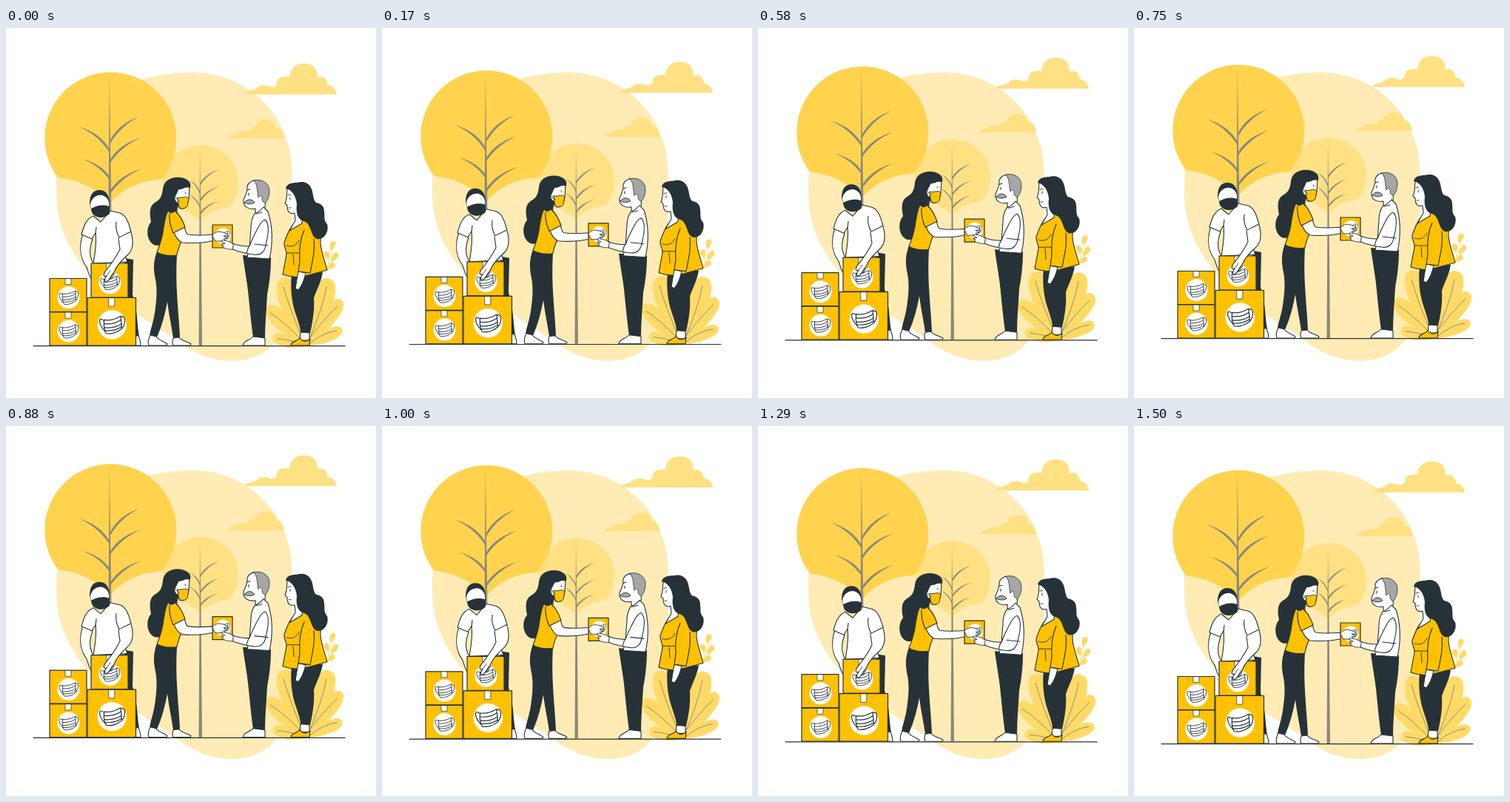
Recreate the animation shown at these times as an HTML page with a canvas. Size 500 by 500 pixels, loop 1.54 s.

```html
<!DOCTYPE html>
<html lang="en">
<head>
<meta charset="utf-8">
<title>Donation</title>
<style>
html, body { margin: 0; width: 100%; height: 100%; overflow: hidden; background: #fff; }
canvas { display: block; width: 500px; height: 500px; }
</style>
</head>
<body>
<canvas id="stage" width="500" height="500"></canvas>
<script>
const ctx = document.getElementById('stage').getContext('2d');
const INK = '#263238', YELLOW = '#ffc100', CROWN = '#ffd34d', PALE = '#ffe082',
      LEAF = '#ffda66', CREAM = '#ffebb3', WOOD = '#888780', GRAY = '#a6a6a6', WHITE = '#fff';
const LOOP = 1540, STEP = 1000 / 24, RISE = 10, CYCLE = 36;

function fill(d, color) {
  ctx.fillStyle = color;
  ctx.fill(new Path2D(d));
}

function line(d, width = 1.1, color = INK) {
  ctx.strokeStyle = color;
  ctx.lineWidth = width;
  ctx.stroke(new Path2D(d));
}

function shape(d, color, width) {
  fill(d, color);
  line(d, width);
}

function disc(x, y, r, color) {
  ctx.fillStyle = color;
  ctx.beginPath();
  ctx.arc(x, y, r, 0, 7);
  ctx.fill();
}

// Tapered twig that leaves the trunk steeply and flattens outwards.
function branch(x, y, dx, dy, w) {
  fill(`M${x} ${y} Q${x + dx * .3} ${y + dy * .72} ${x + dx} ${y + dy}
    Q${x + dx * .37} ${y + dy * .64} ${x} ${y + w * 4}Z`, WOOD);
}

function leaf(x, y, tx, ty, w) {
  const dx = tx - x, dy = ty - y, len = Math.hypot(dx, dy);
  const nx = -dy / len * w, ny = dx / len * w;
  const side = s => [x + dx * .45 + nx * s, y + dy * .45 + ny * s,
                     x + dx * 1.02 + nx * s, y + dy * 1.02 + ny * s];
  const [a, b, c, d] = side(1), [e, f, g, h] = side(-1);
  fill(`M${x} ${y} C${a} ${b} ${c} ${d} ${tx} ${ty} C${g} ${h} ${e} ${f} ${x} ${y}Z`, LEAF);
}

function maskIcon(x, y, s) {
  ctx.save();
  ctx.translate(x, y);
  ctx.scale(s, s);
  disc(0, 0, 15, WHITE);
  line('M-8 -4 C-15 -10 -14 0 -7 7 M9 -8 C15 -11 14 0 10 4', .9);
  shape('M-8 -5 C-3 -4 4 -6 9 -9 L10 4 C6 8 -1 10 -6 9 C-8 6 -9 0 -8 -5Z', WHITE, .9);
  line('M-8 -1 Q2 0 9 -5 M-8 3 Q2 4 10 -1 M-7 6 Q3 7 10 2', .9);
  ctx.restore();
}

function box(x, y, w, h) {
  shape(`M${x} ${y}h${w}v${h}h${-w}Z`, YELLOW, 1.2);
  const mid = x + w / 2;
  fill(`M${mid - 4} ${y + .7}h8v${h * .17}h-8Z`, WHITE);
  line(`M${mid - 4} ${y}v${h * .18}h8v${-h * .18}`, .7);
  maskIcon(mid + .5, y + h * .55 + 1, w / 50);
}

function backdrop() {
  fill(`M252 60 C328 60 386.5 120 386.5 195 L386 360 C386 415 352 450 306 450
    C276 450 250 438 225 418 C165 378 64 325 68 215 C68 120 150 60 252 60Z`, CREAM);
}

function trees() {
  fill('M224 242 A51 51 0 1 1 302 242 Q274 245 262 262 Q249 245 224 242Z', PALE);
  fill('M262 166 L263.5 260 L265 429 L260.5 429 L261.5 260Z', WOOD);
  [[262, 221, -14, -15], [262, 210, 26, -19], [262, 240, -15, -15],
   [262, 232, 26, -18], [262, 250, 25, -16]].forEach(b => branch(...b, .8));

  fill('M70 202 A89 89 0 1 1 211 204 Q165 207 140 238 Q115 207 70 202Z', CROWN);
  fill('M139.8 64 L141 160 L142.5 255 L138.5 255 L139.2 160Z', WOOD);
  [[140, 164, -42, -31], [140, 153, 40, -33], [140, 201, -37, -24],
   [140, 179, 43, -31], [140, 221, 44, -31]].forEach(b => branch(...b, 1.1));
}

function clouds() {
  fill(`M322 89.7 C324 84 334 85 339 81 C344 76 351 77 356 79 C363 81 366 78 366 73
    C367 66 375 65 383 66 C384 55 390 48 402 48 C416 48 421 55 421 67
    C429 63 434 70 435 77 C442 78 446 83 447 89.7Z`, PALE);
  fill(`M299 149 C301 144 308 145 312 142 C316 138 321 139 326 140 C330 137 331 133 337 134
    C338 127 343 124 350 124 C359 123 364 127 364 135 C370 134 374 139 376 149Z`, PALE);
}

function plants() {
  [[405, 428, 374, 338, 20], [405, 428, 353, 377, 15], [405, 430, 361, 418, 11],
   [408, 425, 437, 339, 20], [406, 428, 453, 368, 15], [407, 429, 454, 407, 11],
   [439, 301, 443, 288, 5], [436, 313, 432, 302, 5], [439, 316, 448, 304, 5],
   [434, 326, 444, 318, 5]].forEach(l => leaf(...l));
  line('M404 427 Q384 382 375 350 M402 424 Q374 395 357 385 M400 427 Q382 421 367 420', .9, WOOD);
  line('M407 427 Q428 380 433 350 M411 418 Q430 393 448 376 M411 426 Q427 412 447 409', .9, WOOD);
  line('M431 332 Q438 313 442 294 M436 318 L433 308 M436 318 L446 308', .7, LEAF);
}

function packer() {
  fill('M160 311 L172 313 L171 360 C178 382 177 400 180 417 L165 417Z', INK);
  shape('M175 416 L179 416 C181 421 182 424 182 429 L174 429Z', WHITE);
  shape(`M104 278 C99 293 99 310 109 323 C112 332 113 338 119 342
    L124 330 L116 314 C112 306 113 296 117 285`, WHITE);
  shape(`M118 254 C108 258 105 268 102 279 L116 285 L121 277 C123 292 120 306 118 318
    L164 316 C160 305 157 292 153 283 L169 275 C165 261 162 253 154 250
    L141 247 L128 262Z`, WHITE);
  line('M153 283 C149 276 148 269 149 262 M121 278 L122 269');
  fill('M113 237 C113 225 118 219 126 219 C135 219 140 226 140 238 L140 251 C132 259 120 257 116 249Z', INK);
  fill('M114 238 C116 229 123 225 130 226 C137 228 140 234 139 241 C131 238 122 240 115 244Z', WHITE);
}

function packerHand() {
  shape(`M169 276 C173 290 172 300 164 307 C156 314 150 321 147 328 C143 335 140 342 135 343
    C132 342 134 338 136 335 C132 337 131 334 134 329 C143 318 150 307 154 299 L152 284`, WHITE);
  line('M136 335 L141 328 M139 340 L144 332 M142 340 L147 331', .8);
}

function giver() {
  fill(`M204 302 C199 315 199 326 202 340 C205 355 203 372 201 385 C199 398 195 408 194 416
    L204 418 C211 402 215 386 218 370 C220 387 224 404 226 419 L235 418
    C234 397 232 378 231 358 C230 340 230 325 231 306Z`, INK);
  shape('M195 415 L203 417 C206 422 213 423 218 427 L217 429 L193 429C191 424 193 419 195 415Z', WHITE);
  shape('M226 419 L234 418 C237 423 244 423 250 427 L249 429 L226 429 C224 426 225 423 226 419Z', WHITE);
  shape('M221 236 L231 243 L231 252 L217 250Z', WHITE);
  fill(`M236 202 C223 200 213 207 212 217 C211 228 208 232 201 236 C193 241 194 252 196 262
    C189 270 190 285 197 291 C204 297 213 293 216 284 C221 268 228 258 232 242
    L249 215 C251 208 244 203 236 202Z`, INK);
  shape(`M235 215 C231 220 230 225 228 228 C227 233 230 236 232 236 L234 243
    C240 246 244 243 246 235 C248 229 247 222 248 215Z`, WHITE);
  fill('M249 215 C249 207 241 203 234 206 L233 218 C239 219 244 213 249 215Z', INK);
  shape('M232 229 C238 231 242 226 247 230 L245 241 C241 245 236 245 234 242Z', YELLOW, .9);
  line('M234 234 L229 229 M242 222 L243 224', .9);
  shape(`M219 247 C215 254 215 260 213 269 C212 281 208 293 204 303 C213 308 223 308 231 307
    C232 298 236 292 237 287 L240 267 C237 256 232 250 228 247 C225 251 222 250 219 247Z`, YELLOW);
  shape(`M227 276 L241 268 C243 274 242 277 246 279 C258 281 268 280 281 279 L282 287
    C266 291 250 291 238 290 C232 287 229 282 227 276Z`, WHITE);
  shape('M221 251 C220 262 223 270 226 277 L242 269 C238 258 235 253 230 249', YELLOW);
}

function receiver() {
  fill(`M320 307 C323 330 327 350 328 365 C330 385 332 405 334 418 L350 419
    C350 400 352 380 353 360 C356 345 358 328 358 310Z`, INK);
  shape('M334 417 C330 422 321 422 320 429 L350 429 L350 419Z', WHITE);
  shape(`M336 206 C329 207 325 212 326 218 C325 224 323 228 321 232 C320 241 327 246 337 244
    L337 252 L350 243 L352 215Z`, WHITE);
  shape(`M335 206 C346 203 356 210 356 220 C356 228 353 234 350 237 L346 233
    C347 227 343 224 341 229 C339 222 341 213 335 206Z`, GRAY, .8);
  shape('M322 236 C326 230 333 231 336 236 C331 239 326 238 322 236Z', GRAY, .9);
  line('M328 223 L328 226 M326 219 L330 218');
  shape(`M336 251 C332 257 331 262 331 270 L329 296 L326 310 L356 312
    C360 294 361 270 354 248 L348 242 C344 247 340 249 336 251Z`, WHITE);
  shape(`M333 285 L329 295 C320 295 313 294 306 291 L303 298 C314 302 324 305 334 306
    C345 308 350 301 351 293 C355 278 356 264 350 259 C344 261 339 273 333 285Z`, WHITE);
  line('M328 295 L325 304 M336 292 L354 294 M338 251 L346 249');
}

function parcel() {
  shape('M279 266h27v31h-27Z', YELLOW, 1.2);
  maskIcon(293, 281, .72);
  shape(`M279 280 C284 274 289 274 298 278 L300 281 L294 281 L299 284 L294 285
    L297 288 L291 288 L283 288Z`, WHITE, .9);
  shape(`M307 292 C302 288 297 287 291 287 L291 289 L296 291 L291 292 L294 294
    L292 295 C296 299 301 299 306 299Z`, WHITE, .9);
}

function visitor() {
  fill(`M386 332 C384 350 386 370 391 385 C395 397 398 405 398 412 L411 412
    C415 395 417 380 416 365 C420 353 426 343 428 330Z`, INK);
  shape('M398 411 L410 412 L410 422 L397 422Z', WHITE);
  shape('M397 419 C393 424 385 423 385 429 L410 429 L411 420 C406 425 401 424 397 419Z', YELLOW);
  shape(`M392 262 C384 268 380 279 376 290 C375 297 380 300 379 306 L374 333
    C385 337 397 337 405 335 L434 327 C431 315 425 300 425 290
    C426 277 422 268 415 262 C407 258 398 260 392 262Z`, YELLOW);
  shape(`M380 217 C379 226 380 231 377 237 L380 240 C380 249 384 252 390 250 L391 260
    L383 274 L400 264 L402 235 C398 222 390 216 380 217Z`, WHITE);
  fill(`M393 209 C385 209 379 211 378 217 C386 218 392 227 393 238 C391 252 396 260 403 261
    C413 265 411 281 420 285 C430 287 437 275 434 265 C429 260 431 255 430 248
    C430 240 425 237 419 236 C414 231 416 221 411 214 C407 208 400 207 393 209Z`, INK);
  line('M384 229 L384 232 M381 226 L385 225 M382 243 L385 243', .9);
  line('M379 294 C387 297 393 293 396 287 M379 304 L397 304 M388 306 L389 320', .9);
  shape('M395 329 L405 331 C403 340 400 348 395 354 L391 352 L393 340Z', WHITE);
  fill('M403 273 C397 286 396 300 397 315 L395 329 L411 331 C414 315 418 300 416 285Z', YELLOW);
  line('M403 273 C397 286 396 300 397 315 L395 329 L411 331 C414 315 418 300 416 285');
}

function scene() {
  clouds();
  trees();
  plants();
  line('M37 429.7H458', 1.2);
  packer();
  box(59, 384, 50, 45);
  box(59, 338.5, 50, 45);
  box(115, 318, 50, 46);
  box(110, 364.5, 65.5, 64.5);
  packerHand();
  giver();
  receiver();
  parcel();
  visitor();
}

function draw(now) {
  const step = Math.floor((now % LOOP + 3) / STEP);
  const phase = step % CYCLE / CYCLE;
  const lift = RISE * (1 - Math.abs(1 - 2 * phase));
  ctx.fillStyle = WHITE;
  ctx.fillRect(0, 0, 500, 500);
  backdrop();
  ctx.save();
  ctx.translate(0, -lift);
  scene();
  ctx.restore();
}

ctx.lineJoin = ctx.lineCap = 'round';
const start = performance.now();
function tick() {
  draw(performance.now() - start);
  requestAnimationFrame(tick);
}
tick();
</script>
</body>
</html>
```
